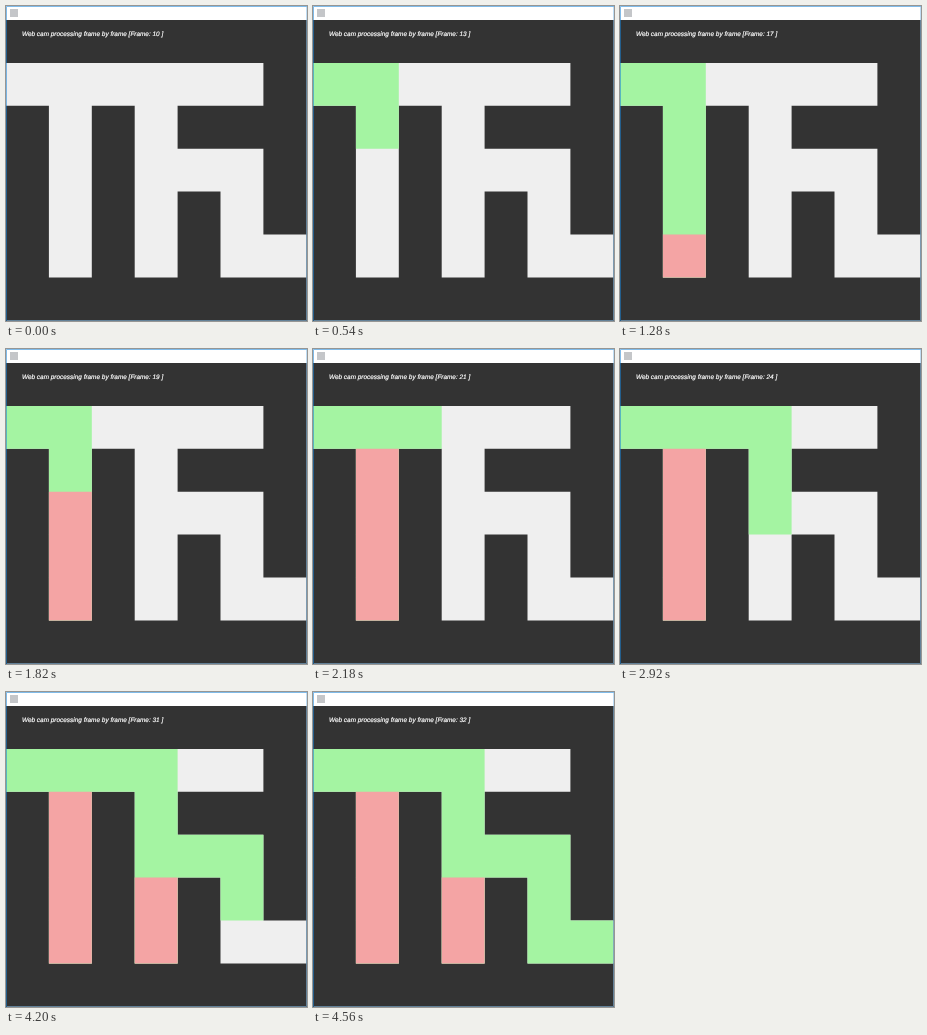
Recreate the animation shown at these times as an HTML page. Size 301 px wide and 315 px high, loop 6.82 s.

```html
<!DOCTYPE html>
<html lang="en">
<head>
<meta charset="utf-8">
<title>Maze search</title>
<style>
  html, body { margin: 0; width: 100%; height: 100%; overflow: hidden; background: #fff; }
  svg { display: block; width: 301px; height: 315px; }
  text {
    font: italic 6.43px "Liberation Sans", Arial, sans-serif;
    fill: #fff; stroke: #fff; stroke-width: .2px;
    white-space: pre; text-rendering: geometricPrecision;
  }
</style>
</head>
<body>
<svg viewBox="0 0 301 315">
  <rect width="301" height="315" fill="#fff"/>
  <rect x="4" y="3" width="8" height="8" fill="#c4c6c9"/>
  <rect y="14" width="301" height="301" fill="#333"/>
  <path id="open" fill="#efefef"/>
  <path id="visited" fill="#a4f4a2"/>
  <path id="deadEnd" fill="#f4a4a4"/>
  <text id="label" x="16" y="30"></text>
  <g fill="none" stroke-opacity=".55">
    <path d="M301 .5H.5V315" stroke="#1883d7"/>
    <path d="M300.5 1V314.5H1" stroke="#8bc1eb"/>
  </g>
</svg>
<script>
const LOOP = 6820, CELL = 42.9, TOP = 14;
const TICK = 183, ROUNDING = 20, PAUSES = [8, 13], LAST_COUNT = 32;
const byId = id => document.getElementById(id);

const layout = [
  '.......',
  '######.',
  '.#.#...',
  '.#.###.',
  '.#.#.#.',
  '.#.#.##',
];

const steps = [];
let ticks = 0;

function record(col, row, dead) {
  do ticks++; while (PAUSES.includes(ticks));
  const start = Math.floor(ticks * TICK / ROUNDING) * ROUNDING;
  steps.push({ col, row, dead, start });
}

// Depth-first search: down before right, marking dead ends on the way back.
function search(col, row) {
  if (layout[row]?.[col] !== '#') return false;
  record(col, row, false);
  if (col === layout[row].length - 1) return true;
  if (search(col, row + 1) || search(col + 1, row)) return true;
  record(col, row, true);
  return false;
}
search(0, 1);

function paint(id, cells) {
  const squares = cells.map(({ col, row }) =>
    `M${col * CELL} ${TOP + row * CELL}h${CELL}v${CELL}h${-CELL}z`);
  byId(id).setAttribute('d', squares.join(''));
}

paint('open', layout.flatMap((line, row) =>
  [...line].flatMap((mark, col) => mark === '#' ? [{ col, row }] : [])));

function draw(time) {
  const done = steps.filter(step => step.start <= time);
  paint('visited', done.filter(step => !step.dead));
  paint('deadEnd', done.filter(step => step.dead));
  const count = Math.min(10 + done.length, LAST_COUNT);
  byId('label').textContent = `Web cam processing frame by frame [Frame: ${count} ]`;
}

const origin = performance.now();
function tick() {
  draw((performance.now() - origin) % LOOP);
  requestAnimationFrame(tick);
}
tick();
</script>
</body>
</html>
```
